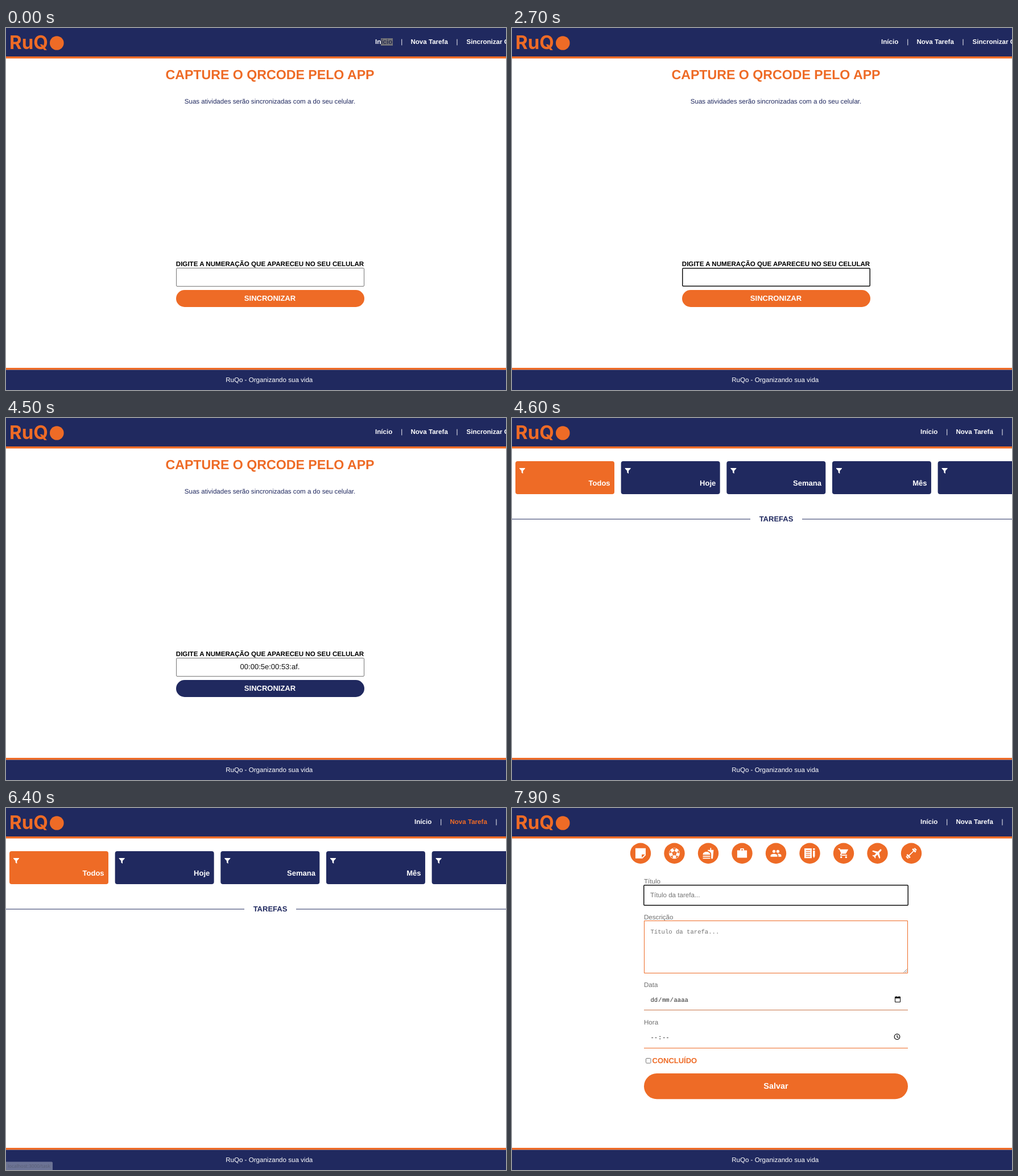
An HTML page with a canvas for the animation above (8 s loop, 879 px wide and 637 px high).

```html
<!DOCTYPE html>
<html lang="pt-BR">
<head>
<meta charset="utf-8">
<title>Tarefas</title>
<style>
  html, body { margin: 0; width: 100%; height: 100%; overflow: hidden; background: #fff; }
  canvas { display: block; }
</style>
</head>
<body>
<canvas id="stage" width="879" height="637"></canvas>
<script>
const LOOP = 8000, MID = 464, BASE = 11.58;
const NAVY = '#20295f', ORANGE = '#ee6b26', WHITE = '#fff', GREY = '#707070';
const SANS = '"Liberation Sans", Arial, sans-serif';
const MONO = '"Liberation Mono", monospace';
const HINT = '"Open Sans", "Noto Sans", sans-serif';
const ctx = document.getElementById('stage').getContext('2d');
ctx.textRendering = 'geometricPrecision';

const within = (t, a, b) => t >= a && t < b;

function rect(x, y, w, h, color) {
  ctx.fillStyle = color;
  ctx.fillRect(x, y, w, h);
}

function rounded(x, y, w, h, r, color) {
  ctx.fillStyle = color;
  ctx.beginPath();
  ctx.roundRect(x, y, w, h, r);
  ctx.fill();
}

function outline(x, y, w, h, r, color, width = 1) {
  ctx.strokeStyle = color;
  ctx.lineWidth = width;
  ctx.beginPath();
  ctx.roundRect(x, y, w, h, r);
  ctx.stroke();
}

function disc(x, y, r, color) {
  ctx.fillStyle = color;
  ctx.beginPath();
  ctx.arc(x, y, r, 0, Math.PI * 2);
  ctx.fill();
}

function shape(path, color) {
  ctx.fillStyle = color;
  ctx.fill(new Path2D(path), 'evenodd');
}

function text(str, x, y, { size = BASE, color = NAVY, bold = false, align = 'left', font = SANS } = {}) {
  ctx.font = `${bold ? 'bold ' : ''}${size}px ${font}`;
  ctx.fillStyle = color;
  ctx.textAlign = align;
  ctx.fillText(str, x, y);
}

// Parts shared by all pages

function chrome() {
  rect(0, 0, 879, 637, WHITE);
  rect(0, 0, 879, 50, NAVY);
  rect(0, 50, 879, 3.6, ORANGE);
  text('RuQ', 6, 37, { size: 33, color: ORANGE, bold: true, font: 'Inter, sans-serif' });
  disc(89.3, 26.5, 12.3, ORANGE);
  rect(0, 598, 879, 3.6, ORANGE);
  rect(0, 601.6, 879, 36, NAVY);
  text('RuQo - Organizando sua vida', 539.3, 623, { color: WHITE, align: 'right' });
}

function nav(x, { selected = false, active = false, last = '' } = {}) {
  const style = { color: WHITE, bold: true };
  const bar = { color: WHITE, align: 'center' };
  text('Início', x, 28, style);
  if (selected) {
    rect(x + 10, 18, 21, 13, '#727278');
    text('ício', x + 10.3, 28, { color: '#2b3050', bold: true });
  }
  text('|', x + 46.8, 28, bar);
  text('Nova Tarefa', x + 62.4, 28, { color: active ? ORANGE : WHITE, bold: true });
  text('|', x + 144, 28, bar);
  text(last, x + 160.5, 28, style);
}

function pill(x, y, w, h, label, size, baseline, color = ORANGE) {
  rounded(x, y, w, h, h / 2, color);
  text(label, MID, baseline, { size, color: WHITE, bold: true, align: 'center' });
}

function focusRing(x, y, w, h) {
  outline(x + 0.75, y + 0.75, w - 1.5, h - 1.5, 1.5, '#101010', 1.5);
}

function caret(x, y, h) {
  rect(x, y, 1, h, '#000');
}

// Sync page

function syncPage(t) {
  nav(649, { selected: t < 2200, last: 'Sincronizar Celular' });
  text('CAPTURE O QRCODE PELO APP', MID, 90, { size: BASE * 2, color: ORANGE, bold: true, align: 'center' });
  text('Suas atividades serão sincronizadas com a do seu celular.', MID, 133.3, { align: 'center' });
  text('DIGITE A NUMERAÇÃO QUE APARECEU NO SEU CELULAR', MID, 418.5,
    { color: '#000', bold: true, align: 'center' });

  if (within(t, 2200, 4500)) {
    focusRing(299, 422, 331, 33);
  } else {
    const hover = within(t, 700, 1100) || within(t, 1700, 2200);
    outline(299.5, 422.5, 330, 32, 1.5, hover ? '#4f4f4f' : '#767676');
  }
  if (t >= 3000) text('00:00:5e:00:53:af.', MID, 442, { size: 13, color: '#111', align: 'center' });
  if (within(t, 2200, 2700)) caret(464, 430, 15);
  if (within(t, 3000, 3500) || within(t, 4000, 4500)) caret(516, 430, 15);

  pill(299, 461, 331, 30, 'SINCRONIZAR', 13, 480.3, t >= 4300 ? NAVY : ORANGE);
}

// Task list page

function homePage(t) {
  nav(718, { active: t >= 6100 });
  ['Todos', 'Hoje', 'Semana', 'Mês', 'Ano'].forEach((label, i) => {
    const x = 6 + i * 185.65;
    const lit = i === 0 || (i === 1 && within(t, 5300, 5500));
    rounded(x, 76, 174, 58, 4, lit ? ORANGE : NAVY);
    ctx.save();
    ctx.translate(x + 7, 88);
    shape('M0 0H10V1L6.3 5V10L3.7 8V5L0 1Z', WHITE);
    ctx.restore();
    text(label, x + 166.6, 119, { size: 13, color: WHITE, bold: true, align: 'right' });
  });
  const line = '#6a7193';
  rect(0, 177.2, 419, 1.5, line);
  rect(510, 177.2, 369, 1.5, line);
  text('TAREFAS', MID + 0.5, 182.3, { size: 13, bold: true, align: 'center' });
}

// Task icons, each drawn on a 24 unit grid

function ball() {
  disc(12, 12, 11, WHITE);
  ctx.translate(12, 12);
  for (let i = 0; i < 5; i++) {
    shape('M0 0L-2.6-3.5L0-4.4L2.6-3.5Z', ORANGE);
    shape('M-3.4-9L0-6.8L3.4-9L2-10H-2Z', ORANGE);
    shape('M-.6-3.5H.6V-7.2H-.6Z', ORANGE);
    ctx.rotate(Math.PI * 0.4);
  }
}

function tilted(angle, path) {
  ctx.translate(12, 12);
  ctx.rotate(angle);
  ctx.translate(-12, -12);
  shape(path, WHITE);
}

function people() {
  shape('M16 13C20 13 23 14.5 23 16.5V19H17V16.5C17 15 16.2 14 15 13.1Z', WHITE);
  disc(16, 8, 3, WHITE);
  disc(8, 8, 3, WHITE);
  shape('M1 19V16.5C1 12 15 12 15 16.5V19Z', WHITE);
}

function cart() {
  shape('M1 2H4.3L5.2 4H21.5L17 12C16.7 12.7 16 13 15.5 13H8.1L7.2 15H19V17H6.5C5 17 4.6 15.4 5.3 14L6.6 11.6L3 4H1Z', WHITE);
  disc(7, 20, 2, WHITE);
  disc(17, 20, 2, WHITE);
}

const icons = [
  () => shape('M1.5 1.5H22.5V16L16 22.5H1.5ZM14.5 21V14.5H21Z', WHITE),
  ball,
  () => shape('M1 21H16V23H1ZM1 17H16V19H1ZM1 15C1 7 16 7 16 15ZM16 1H18V5H23L21.3 23H18V14C18 10 15 8 11.2 7L11 5H16Z', WHITE),
  () => shape('M2 6H8V3L9 2H15L16 3V6H22V21H2ZM10 4V6H14V4Z', WHITE),
  people,
  () => shape('M1 2H16V22H1ZM4 6V7.5H13V6ZM4 10V11.5H13V10ZM4 14V15.5H13V14ZM4 18V19.2H13V18ZM18.5 2H22.5V5H18.5ZM18.5 6.5H22.5V18L20.5 22L18.5 18Z', WHITE),
  cart,
  () => tilted(Math.PI / 4, 'M10.2 9V3C10.2 .5 13.8 .5 13.8 3V9L22.5 14.5V17L13.8 14V19.5L16 21.2V23L12 21.8L8 23V21.2L10.2 19.5V14L1.5 17V14.5Z'),
  () => tilted(-Math.PI / 4, 'M-1 9H1.5V15H-1ZM2.3 7.5H5.5V16.5H2.3ZM5.5 11H18.5V13H5.5ZM18.5 7.5H21.7V16.5H18.5ZM22.5 9H25V15H22.5Z')
];

function iconRow(t) {
  icons.forEach((draw, i) => {
    ctx.save();
    if (i === 7 && within(t, 6800, 6900)) ctx.globalAlpha = 0.5;
    ctx.translate(MID + (i - 4) * 59.5, 79.7);
    disc(0, 0, 18.2, ORANGE);
    ctx.scale(0.86, 0.86);
    ctx.translate(-12, -12);
    draw();
    ctx.restore();
  });
}

// Task form page

function segments(parts, y, color) {
  let x = 243.5;
  for (const part of parts) {
    text(part, x, y, { size: 10.6, color, font: MONO });
    x += part.length * 6.36 + 0.7;
  }
}

function fieldIcons() {
  outline(673.5, 332.5, 9, 9, 0.5, '#111', 1.1);
  rect(673, 332, 10, 3, '#111');
  rect(675, 331, 1, 1, '#111');
  rect(680, 331, 1, 1, '#111');
  outline(672.2, 397.7, 9.6, 9.6, 4.8, '#111', 1.2);
  ctx.beginPath();
  ctx.moveTo(677, 399.5);
  ctx.lineTo(677, 402.8);
  ctx.lineTo(679.3, 404.2);
  ctx.stroke();
}

function resizeGrip() {
  ctx.strokeStyle = '#666';
  ctx.lineWidth = 0.8;
  ctx.beginPath();
  for (const d of [6, 3]) {
    ctx.moveTo(694.5 - d, 289.5);
    ctx.lineTo(694.5, 289.5 - d);
  }
  ctx.stroke();
}

function formPage(t) {
  const focused = t >= 7400;
  nav(718, { active: t < 6800 });
  iconRow(t);

  text('Título', 232, 132.5, { color: GREY });
  text('Título da tarefa...', 243, 156.7, { color: '#757575' });
  text('Descrição', 232, 195.5, { color: GREY });
  outline(232.5, 198.5, 463, 92, 0, ORANGE);
  text('Título da tarefa...', 243.5, 221, { size: 10.6, color: '#757575', font: MONO });
  resizeGrip();
  text('Data', 232, 315, { color: GREY });
  segments(['dd', '/', 'mm', '/', 'aaaa'], 341, focused ? '#2a2a2a' : '#000');
  text('Hora', 232, 380.5, { color: GREY });
  segments(['--', ':', '--'], 406.5, '#111');
  fieldIcons();
  rect(232, 355, 464, 1, '#c9764a');
  rect(232, 422, 464, 1, ORANGE);

  if (focused) {
    focusRing(231, 135, 466, 37);
    if (t < 7900) caret(243, 147, 13);
  } else {
    rect(232, 170, 464, 1, ORANGE);
  }

  outline(235.5, 440.5, 8.5, 8.5, 1.5, '#767676');
  text('CONCLUÍDO', 246.5, 448.5, { size: 13, color: ORANGE, bold: true });
  pill(232, 467, 464, 45.3, 'Salvar', 14.45, 494.3);
}

function linkHint(t) {
  if (!within(t, 6400, 7200)) return;
  ctx.save();
  ctx.globalAlpha = t < 6500 || t >= 7100 ? 0.4 : 1;
  rounded(0, 622.5, 82, 15, [0, 2, 0, 0], '#dee1e6');
  text('localhost:3000/task', 3, 633.3, { size: 8.3, color: '#3f4347', font: HINT });
  ctx.restore();
}

function render(t) {
  chrome();
  if (t < 4600) syncPage(t);
  else if (t < 6500) homePage(t);
  else formPage(t);
  linkHint(t);
}

const start = performance.now();
function tick() {
  render((performance.now() - start) % LOOP);
  requestAnimationFrame(tick);
}
tick();
</script>
</body>
</html>
```
